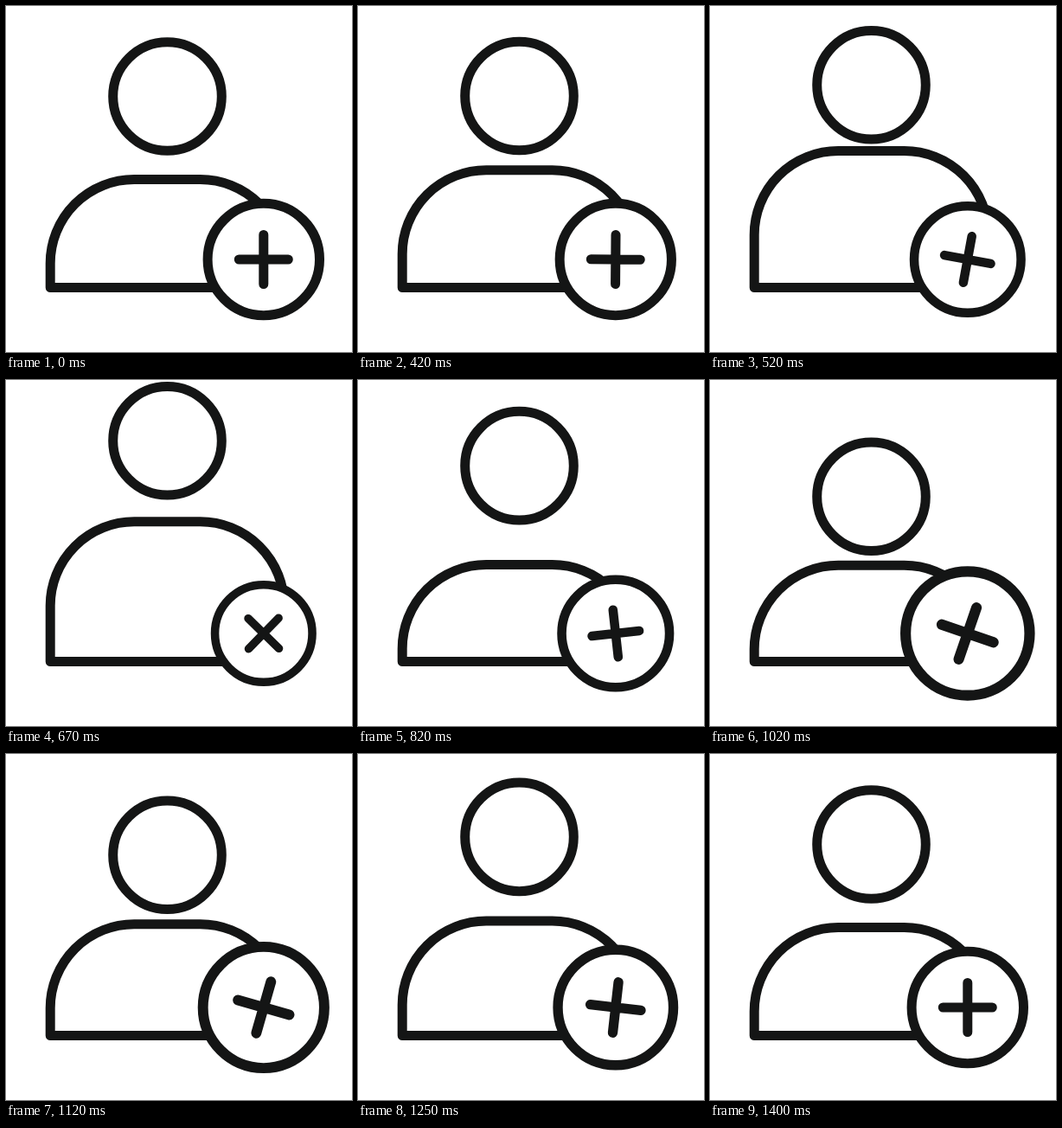
An HTML page that plays this animation: 400 px wide and 400 px high, repeating every 1.42 s.

```html
<!DOCTYPE html>
<html lang="en">
<head>
<meta charset="utf-8">
<title>Add user</title>
<style>
  html, body { margin: 0; width: 100%; height: 100%; overflow: hidden; background: #fff; }
  svg { display: block; width: 100vw; height: 100vh; }
</style>
</head>
<body>
<svg viewBox="0 0 400 400" fill="none" stroke="#141515" stroke-width="11" stroke-linecap="round" stroke-linejoin="round">
  <circle id="head" cx="186.5" r="62.8"/>
  <path id="body"/>
  <g id="badge">
    <circle r="64.7" fill="#fff"/>
    <path id="plus" d="M-28.5 0H28.5M0 -28.5V28.5"/>
  </g>
</svg>
<script>
const LOOP = 1420, START = 420, END = 1400;
const BEAT = 290;        // time from one turn of a swing to the next
const BODY_LEAD = 74;    // the body moves ahead of the head
const LEFT = 51.2, RIGHT = 321.6, FLOOR = 325.5, SHOULDER = 97;

const [head, body, badge, plus] = ['head', 'body', 'badge', 'plus'].map(id => document.getElementById(id));

const easeInOut = u => (1 - Math.cos(Math.PI * Math.min(Math.max(u, 0), 1))) / 2;

// Eases from turn to turn, one per beat; the last turn is reached at END.
function swing(time, start, beat, ...turns) {
  const last = turns.length - 1;
  return turns.slice(1).reduce((value, turn, i) => {
    const from = start + i * beat;
    const to = i + 1 === last ? END : from + beat;
    return value + (turn - turns[i]) * easeInOut((time - from) / (to - from));
  }, turns[0]);
}

// The picture rests, then advances in alternating 30 ms and 20 ms steps.
function stepTime(time) {
  if (time < START) return 0;
  const rest = (time - START) % 50;
  return time - rest + (rest >= 30 ? 30 : 0);
}

function draw(now) {
  const time = stepTime(now % LOOP);
  const headY = 104.5 + swing(time, 397, BEAT, 0, -34.5, 32.5, -9, 0);
  const top = 200.5 + swing(time, 397 - BODY_LEAD, BEAT, 0, -43, 26, -9, 0);
  const scale = swing(time, 405, BEAT, 1, 0.867, 1.11, 1);
  const angle = swing(time, 395, 625, 0, 109, 90);
  const arc = `${SHOULDER} ${SHOULDER} 0 0 1 ${SHOULDER}`;

  head.setAttribute('cy', headY);
  body.setAttribute('d', `M${LEFT} ${FLOOR}V${top + SHOULDER}a${arc} ${-SHOULDER}H${RIGHT - SHOULDER}a${arc} ${SHOULDER}V${FLOOR}Z`);
  badge.setAttribute('transform', `translate(297.8 293) scale(${scale})`);
  plus.setAttribute('transform', `rotate(${angle})`);
}

const begin = performance.now();
function tick() {
  draw(performance.now() - begin);
  requestAnimationFrame(tick);
}
tick();
</script>
</body>
</html>
```
